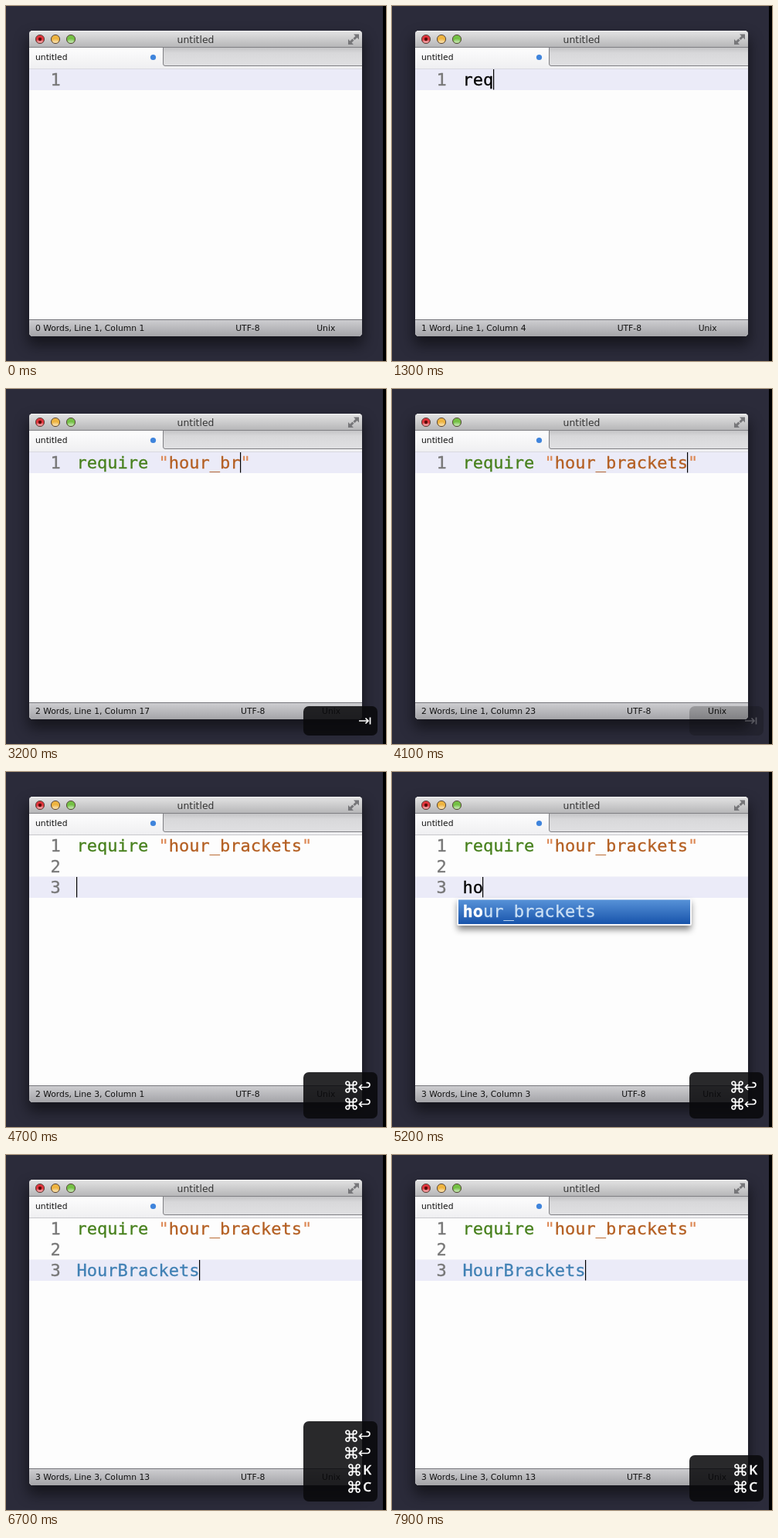
An HTML page for the animation above (8 s loop, 492 px wide and 460 px high).

```html
<!DOCTYPE html>
<html lang="en">
<head>
<meta charset="utf-8">
<title>Editor</title>
<style>
  html, body { margin: 0; width: 100%; height: 100%; overflow: hidden; background: #292937; }
  svg { display: block; width: 492px; height: 460px; }
  text { white-space: pre; }
  .ui { font: 10.75px "DejaVu Sans", sans-serif; fill: #111; }
  .code { font: 22px "DejaVu Sans Mono", monospace; color: #000; fill: currentColor; stroke: currentColor; stroke-width: .3; }
  .num { color: #777; }
  .call { color: #47801c; }
  .str { color: #b45f22; }
  .quote { color: #dd8a58; }
  .type { color: #4080b4; }
  .hint { color: #cbe0f5; }
  .match { color: #fff; font-weight: bold; }
  .key { font: 600 17px "Open Sans", sans-serif; fill: #fff; stroke: #fff; stroke-width: .3; }
  .icon { fill: none; stroke: #fff; stroke-width: 1.7; }
</style>
</head>
<body>
<svg viewBox="0 0 492 460">
  <defs>
    <linearGradient id="title" x2="0" y2="1"><stop offset="0" stop-color="#e4e4e4"/><stop offset="1" stop-color="#b4b4b6"/></linearGradient>
    <linearGradient id="tabs" x2="0" y2="1"><stop offset="0" stop-color="#c4c4c6"/><stop offset=".3" stop-color="#d8d8da"/><stop offset="1" stop-color="#e0e0e2"/></linearGradient>
    <linearGradient id="tab" x2="0" y2="1"><stop offset="0" stop-color="#fdfdfd"/><stop offset="1" stop-color="#efeff1"/></linearGradient>
    <linearGradient id="foot" x2="0" y2="1"><stop offset="0" stop-color="#cfcfd2"/><stop offset="1" stop-color="#a4a4a8"/></linearGradient>
    <linearGradient id="pick" x2="0" y2="1"><stop offset="0" stop-color="#5792d8"/><stop offset="1" stop-color="#1854ab"/></linearGradient>
    <linearGradient id="gloss" x2="0" y2="1"><stop offset="0" stop-color="#fff" stop-opacity=".1"/><stop offset="1" stop-color="#fff" stop-opacity=".65"/></linearGradient>
    <clipPath id="frame"><rect x="30" y="32" width="431" height="396" rx="4.5"/></clipPath>
    <filter id="blur" x="-20%" y="-20%" width="140%" height="140%"><feGaussianBlur stdDeviation="9"/></filter>
    <filter id="soft" x="-10%" y="-60%" width="120%" height="220%"><feGaussianBlur stdDeviation="4"/></filter>
  </defs>
  <rect width="492" height="460" fill="#2b2b3a"/>
  <rect x="28" y="40" width="435" height="400" rx="6" fill="#000" opacity=".5" filter="url(#blur)"/>
  <rect x="488" width="4" height="460" fill="#000"/>
  <g clip-path="url(#frame)">
    <rect x="30" y="32" width="431" height="396" fill="#fdfdfd"/>
    <rect x="30" y="32" width="431" height="22" fill="url(#title)"/>
    <path d="M30 32.5H461" stroke="#f4f4f4"/>
    <rect x="30" y="54" width="431" height="27" fill="#f0f0f2"/>
    <rect x="203" y="54" width="258" height="23" fill="url(#tabs)"/>
    <path d="M30 54H203.5V75q0 2.5 2.5 2.5H461V81.5H30z" fill="url(#tab)"/>
    <path d="M30 53.5H461M203.5 54V75q0 2.5 2.5 2.5H461" fill="none" stroke="#808084"/>
    <path d="M30 81.5H461" stroke="#c8c8cc"/>
    <rect x="30" y="406" width="431" height="22" fill="url(#foot)"/>
    <path d="M30 406.5H461" stroke="#75757a"/>
  </g>
  <g id="lights"></g>
  <g fill="#77777a"><path d="M450 36.5h7v7l-2.4-2.4-3 3-2.2-2.2 3-3z"/><path d="M450 50h-7v-7l2.4 2.4 3-3 2.2 2.2-3 3z"/></g>
  <text class="ui" x="245.5" y="47.5" text-anchor="middle" style="font-size:12.4px;fill:#333">untitled</text>
  <text class="ui" x="38" y="70">untitled</text>
  <circle cx="190.5" cy="66.5" r="3.6" fill="#3f84dc"/>
  <g id="code"></g>
  <g class="ui">
    <text id="where" x="38" y="421"></text>
    <text id="enc" y="421">UTF-8</text>
    <text id="eol" y="421">Unix</text>
  </g>
  <g id="keys"></g>
</svg>
<script>
const $ = id => document.getElementById(id);
const LOOP = 8000, LEFT = 91.5, CHAR = 13.245, PITCH = 27;
const FILE = 'hour_brackets', CLASS = 'HourBrackets';
const TAB = 1500, TYPE = 2300, STEP = 140, BREAKS = [4500, 4700], ACCEPT = 5700, CASE = 6600;
const HOLD = 2400, FADE = 270, BLINK = 500;

const keys = [
  { at: TAB, tab: true },
  ...BREAKS.map(at => ({ at, enter: true })),
  { at: 6300, letter: 'K' },
  { at: CASE, letter: 'C' }
];
const trigger = [700, 900, 1000], prefix = [5100, 5200];
const strokes = [-900, ...trigger, ...keys.map(k => k.at), ...prefix, ACCEPT,
  ...[...FILE].map((c, i) => TYPE + i * STEP)];

const CMD = 'M-2.4-4.7V4.7A2.3 2.3 0 1 1-4.7 2.4H4.7A2.3 2.3 0 1 1 2.4 4.7V-4.7A2.3 2.3 0 1 1 4.7-2.4H-4.7A2.3 2.3 0 1 1-2.4-4.7Z';
const ENTER = 'M-3.5-3L-7 .5L-3.5 4M-7 .5H3.5a2.9 2.9 0 0 0 0-5.8H2';
const TABKEY = 'M-7.5 0H4.5M1-3.5L4.5 0L1 3.5M7-4.5V4.5';

$('lights').innerHTML = ['#e0343c', '#eeb440', '#74c044'].map((c, i) => {
  const x = 44 + 20 * i;
  return `<circle cx="${x}" cy="43" r="5.6" fill="${c}" stroke="#5a4a40"/>` +
    `<ellipse cx="${x}" cy="45.3" rx="3.8" ry="2.5" fill="url(#gloss)"/>` +
    (i ? '' : `<circle cx="${x}" cy="43" r="2.2" fill="#5a0c08"/>`);
}).join('');

const span = (cls, s) => `<tspan class="${cls}">${s}</tspan>`;
const count = (times, t) => times.filter(a => a <= t).length;

function put(id, html) {
  const el = $(id);
  if (el.last !== html) el.innerHTML = el.last = html;
}

// Contents of the buffer at time t
function buffer(t) {
  if (t < TAB) {
    const s = 'req'.slice(0, count(trigger, t));
    return { lines: [s], col: s.length, words: s ? 1 : 0 };
  }
  const n = Math.max(0, Math.min(FILE.length, Math.floor((t - TYPE) / STEP) + 1));
  const lines = [span('call', 'require') + ' ' + span('quote', '"') +
    span('str', FILE.slice(0, n)) + span('quote', '"')];
  let col = 9 + n, words = n ? 2 : 1;
  if (t >= BREAKS[0]) { lines.push(''); col = 0; }
  if (t >= BREAKS[1]) {
    const word = t >= CASE ? CLASS : FILE.slice(0, t >= ACCEPT ? FILE.length : count(prefix, t));
    lines.push(t >= CASE ? span('type', word) : word);
    col = word.length;
    if (col) words = 3;
  }
  return { lines, col, words };
}

function popup(n) {
  return '<rect x="85" y="169" width="302" height="35" fill="#000" opacity=".5" filter="url(#soft)"/>' +
    '<rect x="84" y="163.5" width="304" height="35.5" rx="2" fill="#f8f8fb"/>' +
    '<rect x="86" y="165.5" width="300" height="31.5" fill="url(#pick)"/>' +
    `<text class="code hint" x="${LEFT}" y="188">${span('match', FILE.slice(0, n))}${FILE.slice(n)}</text>`;
}

function drawCode(t) {
  const b = buffer(t), row = b.lines.length - 1;
  const top = 81.5 + row * PITCH, x = LEFT + b.col * CHAR;
  let out = `<rect x="30" y="${top}" width="431" height="27.5" fill="#ebebf8"/>`;
  b.lines.forEach((s, i) => {
    const y = 103 + i * PITCH;
    out += `<text class="code num" x="57.5" y="${y}">${i + 1}</text>` +
      `<text class="code" x="${LEFT}" y="${y}">${s}</text>`;
  });
  const since = t - Math.max(...strokes.filter(a => a <= t));
  if (since % (2 * BLINK) < BLINK) out += `<rect x="${Math.round(x - .5)}" y="${top + .5}" width="1.2" height="26.5"/>`;
  if (t >= prefix[0] && t < ACCEPT) out += popup(b.col);
  put('code', out);

  put('where', `${b.words} Word${b.words === 1 ? '' : 's'}, Line ${row + 1}, Column ${b.col + 1}`);
  const end = 38 + $('where').getComputedTextLength();
  $('enc').setAttribute('x', end + 118);
  $('eol').setAttribute('x', end + 223);
}

function drawKeys(t) {
  const alpha = k => Math.min(1, 1 - (t - k.at - HOLD) / FADE);
  const shown = keys.filter(k => t >= k.at && alpha(k) > 0);
  if (!shown.length) return put('keys', '');
  const h = 22 * shown.length + 16, a = Math.max(...shown.map(alpha));
  const icon = (d, x, y) => `<path class="icon" d="${d}" transform="translate(${x} ${y})"/>`;
  let out = `<rect x="385" y="${449 - h}" width="96" height="${h}" rx="7" fill="#0a0a0c" opacity="${.87 * a}"/>`;
  shown.forEach((k, i) => {
    const y = 430 - 22 * (shown.length - 1 - i);
    out += `<g opacity="${alpha(k)}">`;
    if (k.tab) out += icon(TABKEY, 464.5, y);
    else if (k.enter) out += icon(CMD, 447, y) + icon(ENTER, 464.5, y);
    else out += icon(CMD, 451, y) + `<text class="key" x="473" y="${y + 6}" text-anchor="end">${k.letter}</text>`;
    out += '</g>';
  });
  put('keys', out);
}

const start = performance.now();
function tick() {
  const t = (performance.now() - start) % LOOP;
  drawCode(t);
  drawKeys(t);
  requestAnimationFrame(tick);
}
tick();
</script>
</body>
</html>
```
